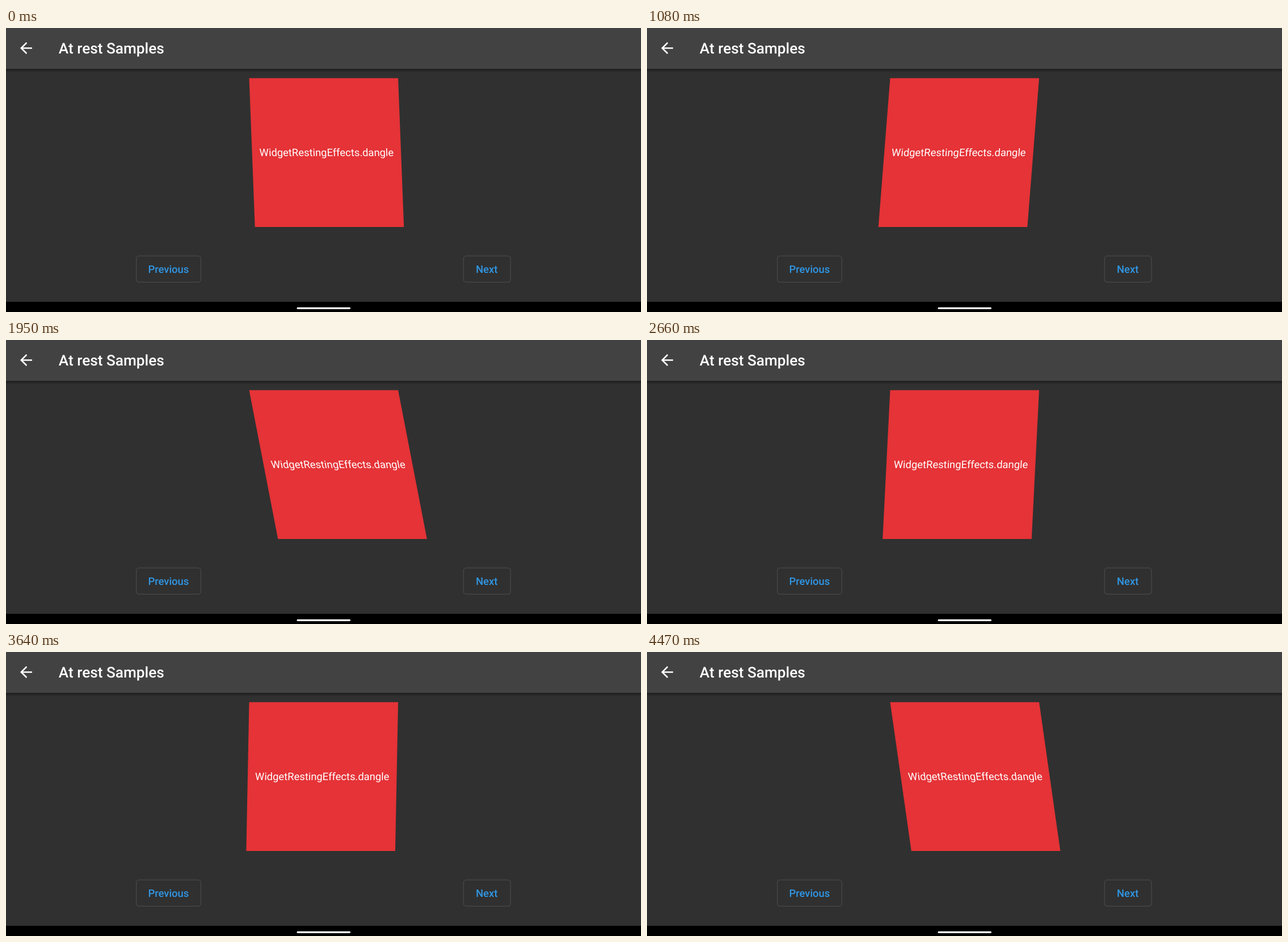
Animation, 1119 px wide and 501 px high, one loop 4.5 s. Source, as an HTML page:

```html
<!DOCTYPE html>
<html lang="en">
<head>
<meta charset="utf-8">
<title>At rest Samples</title>
<style>
  html, body { margin: 0; width: 100%; height: 100%; overflow: hidden; background: #303030; }
  svg { display: block; width: 1119px; height: 501px; }
  text { font: 18.4px Roboto, sans-serif; fill: #fff; text-rendering: geometricPrecision; }
  .title { font-size: 26.2px; font-weight: 500; }
  .button text { font-weight: 500; fill: #3096e4; text-anchor: middle; }
  .button rect { fill: none; stroke: #484848; stroke-width: 1.3px; }
</style>
</head>
<body>
<svg viewBox="0 0 1119 501">
  <defs>
    <linearGradient id="shade" x2="0" y2="1">
      <stop offset="0" stop-opacity=".45"/>
      <stop offset=".4" stop-opacity=".2"/>
      <stop offset="1" stop-opacity="0"/>
    </linearGradient>
  </defs>

  <rect width="1119" height="501" fill="#303030"/>
  <rect y="72" width="1119" height="7" fill="url(#shade)"/>
  <rect width="1119" height="72" fill="#424242"/>
  <path fill="#fff" transform="translate(19.7 19.7) scale(1.3125)"
    d="M20 11H7.83l5.59-5.59L12 4l-8 8 8 8 1.41-1.41L7.83 13H20z"/>
  <text class="title" x="92.8" y="45.4">At rest Samples</text>

  <g id="card">
    <rect width="262.5" height="262.5" fill="#e53337"/>
    <text x="131.25" y="137.8" text-anchor="middle">WidgetRestingEffects.dangle</text>
  </g>

  <g class="button">
    <rect x="229.6" y="402.2" width="113.7" height="46.2" rx="4.6"/>
    <text x="286.4" y="432">Previous</text>
  </g>
  <g class="button">
    <rect x="806.3" y="402.2" width="82.8" height="46.2" rx="4.6"/>
    <text x="847.2" y="432">Next</text>
  </g>

  <rect y="483" width="1119" height="18" fill="#000"/>
  <rect x="512.5" y="492.7" width="94.5" height="3.2" rx="1.6" fill="#fff"/>
</svg>
<script>
  const LOOP = 4500;
  const MAX_SKEW = 0.202;
  // Times (ms) at which the swing reverses, starting from the far right.
  const turns = [-480, 711, 1926, 3102, 4295, 5485];
  const card = document.getElementById('card');

  function skewAt(t) {
    const i = turns.findIndex(turn => turn > t) - 1;
    const progress = (t - turns[i]) / (turns[i + 1] - turns[i]);
    const side = i % 2 ? -1 : 1;
    return side * MAX_SKEW * (1 - 2 * progress);
  }

  function draw() {
    const skew = skewAt(performance.now() % LOOP);
    card.setAttribute('transform', `matrix(1 0 ${skew} 1 428.5 88.5)`);
    requestAnimationFrame(draw);
  }
  draw();
</script>
</body>
</html>
```
